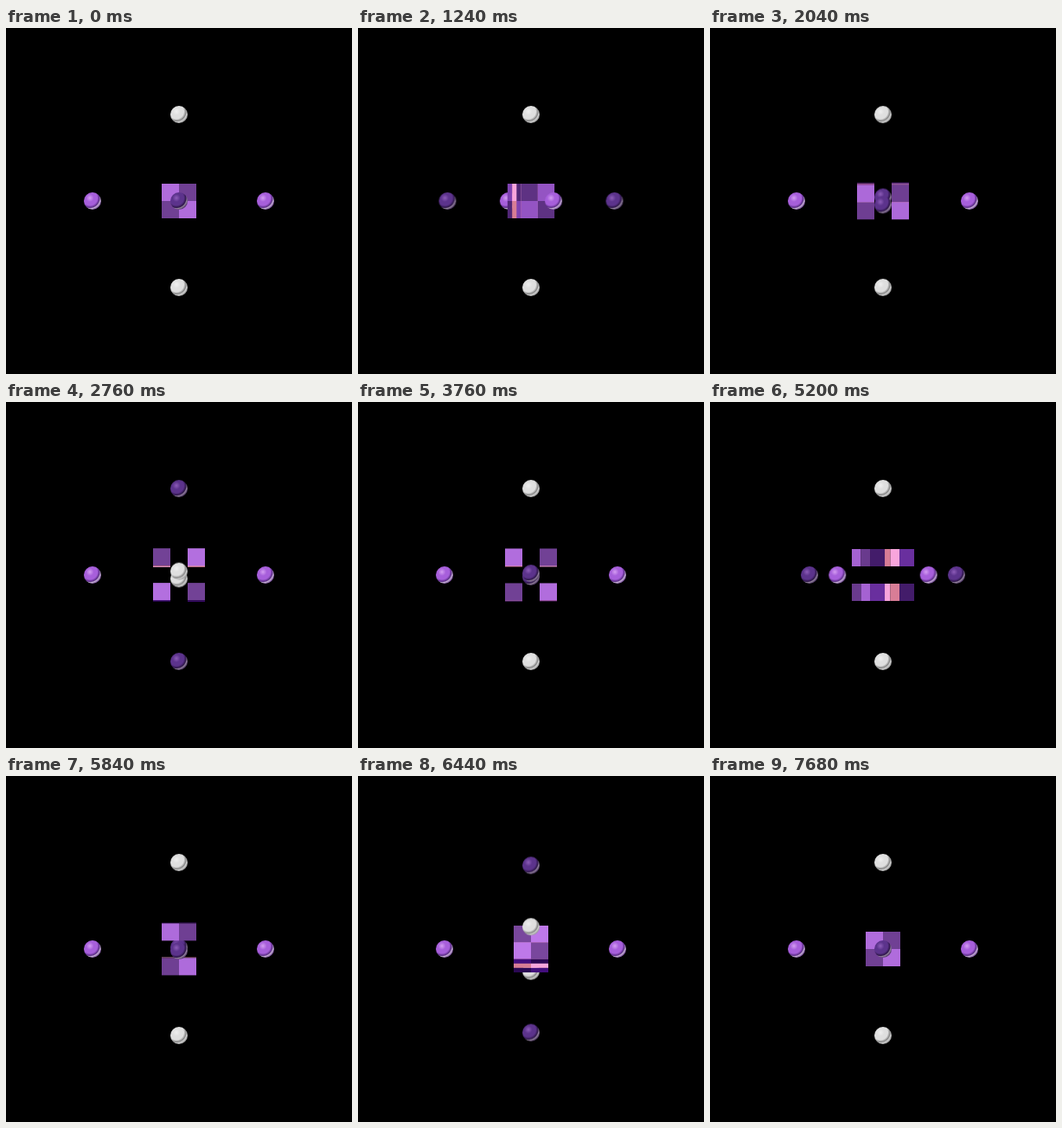
Recreate the animation shown at these times as an HTML page without scripts. Size 400x400 px, loop 7720 ms.

```html
<!DOCTYPE html>
<html lang="en">
<head>
<meta charset="utf-8">
<title>Turning cube</title>
<style>
@property --a { syntax: "<angle>"; inherits: true; initial-value: 0deg; }
@property --b { syntax: "<angle>"; inherits: true; initial-value: 0deg; }
@property --gx { syntax: "<number>"; inherits: true; initial-value: 0; }
@property --gy { syntax: "<number>"; inherits: true; initial-value: 0; }
@property --gz { syntax: "<number>"; inherits: true; initial-value: 0; }

html, body {
  margin: 0;
  width: 100%;
  height: 100%;
  overflow: hidden;
  background: #000;
}

.world, .world * {
  position: absolute;
  transform-style: preserve-3d;
}

.world {
  left: 200px;
  top: 200px;
  transform: rotateX(calc(-1 * var(--b))) rotateY(var(--a));
  animation: 7.72s infinite cubic-bezier(.45, 0, .55, 1);
  animation-name: yaw, pitch, gap-x, gap-y, gap-z;
  /* light on each axis, coming from the upper left */
  --ix: calc(-.48 * cos(var(--a)) - sin(var(--a)) * cos(var(--b)));
  --iy: calc(-.45 * cos(var(--b)) - sin(var(--b)));
  --iz: calc(cos(var(--a)) * (cos(var(--b)) - .45 * sin(var(--b))) - .48 * sin(var(--a)));
}

/* eight quarter turns of 960 ms, then a 40 ms rest */
@keyframes yaw {
  0% { --a: 0deg; }
  12.435% { --a: 90deg; }
  24.87%, 49.741% { --a: 180deg; }
  62.176% { --a: 90deg; }
  74.611%, 100% { --a: 0deg; }
}
@keyframes pitch {
  0%, 24.87% { --b: 0deg; }
  37.306% { --b: 90deg; }
  49.741%, 74.611% { --b: 180deg; }
  87.047% { --b: 270deg; }
  99.482%, 100% { --b: 360deg; }
}

/* each gap switches while its axis points at the viewer */
@keyframes gap-x {
  0%, 12.43% { --gx: 0; }
  12.44%, 62.17% { --gx: 10; }
  62.18%, 100% { --gx: 0; }
}
@keyframes gap-z {
  0%, 24.865% { --gz: 0; }
  24.875%, 74.605% { --gz: 10; }
  74.615%, 100% { --gz: 0; }
}
@keyframes gap-y {
  0%, 37.3% { --gy: 0; }
  37.31%, 87.04% { --gy: 10; }
  87.05%, 100% { --gy: 0; }
}

.box {
  --p: calc(var(--x) * var(--y) * var(--z));
  transform: translate3d(
    calc(var(--x) * (10 + var(--gx)) * 1px),
    calc(var(--y) * (10 + var(--gy)) * 1px),
    calc(var(--z) * (10 + var(--gz)) * 1px));
}

.box i {
  --k: 1;
  --l: max(.38, var(--i));
  left: -10px;
  top: -10px;
  width: 20px;
  height: 20px;
  backface-visibility: hidden;
  background: rgb(
    calc((144 + 32 * var(--p)) * var(--l))
    calc((86 + 22 * var(--p)) * (1.4 * var(--l) - .4))
    calc((184 + 36 * var(--p)) * (.3 + .7 * var(--l))));
}
.box .x {
  --i: calc(var(--x) * var(--ix));
  transform: rotateY(calc(var(--x) * var(--k) * 90deg)) translateZ(10px);
}
.box .y {
  --i: calc(var(--y) * var(--iy));
  transform: rotateX(calc(var(--y) * var(--k) * -90deg)) translateZ(10px);
}
.box .z {
  --i: calc(var(--z) * var(--iz));
  transform: rotateY(calc((1 - var(--z) * var(--k)) * 90deg)) translateZ(10px);
}

/* inner faces glow pink */
.box .in {
  --k: -1;
  background: rgb(
    calc(232 + 16 * var(--p))
    calc(145 + 20 * var(--p))
    calc(185 + 35 * var(--p)));
}
.x.in { opacity: var(--gx); }
.y.in { opacity: var(--gy); }
.z.in { opacity: var(--gz); }

.ball {
  left: -10px;
  top: -10px;
  width: 20px;
  height: 20px;
  border-radius: 50%;
  transform: translate3d(var(--at)) rotateY(calc(-1 * var(--a))) rotateX(var(--b));
  background: radial-gradient(circle at 7px 6.5px,
    var(--hi) 0, var(--main) 4.5px, var(--main) 8.5px,
    var(--shade) 11px, var(--rim) 12.2px, var(--shade) 15px);
}
.lilac { --hi: #d49cf2; --main: #a75fdb; --shade: #5c2d88; --rim: #c4aed2; }
.white { --hi: #efefef; --main: #dfdfdf; --shade: #858585; --rim: #cfcfcf; }
.plum { --hi: #8d5cb8; --main: #5c338c; --shade: #2e164a; --rim: #93829c; }
</style>
</head>
<body>
<div class="world">
  <div class="box" style="--x:-1;--y:-1;--z:-1"><i class="x"></i><i class="y"></i><i class="z"></i><i class="x in"></i><i class="y in"></i><i class="z in"></i></div>
  <div class="box" style="--x:1;--y:-1;--z:-1"><i class="x"></i><i class="y"></i><i class="z"></i><i class="x in"></i><i class="y in"></i><i class="z in"></i></div>
  <div class="box" style="--x:-1;--y:1;--z:-1"><i class="x"></i><i class="y"></i><i class="z"></i><i class="x in"></i><i class="y in"></i><i class="z in"></i></div>
  <div class="box" style="--x:1;--y:1;--z:-1"><i class="x"></i><i class="y"></i><i class="z"></i><i class="x in"></i><i class="y in"></i><i class="z in"></i></div>
  <div class="box" style="--x:-1;--y:-1;--z:1"><i class="x"></i><i class="y"></i><i class="z"></i><i class="x in"></i><i class="y in"></i><i class="z in"></i></div>
  <div class="box" style="--x:1;--y:-1;--z:1"><i class="x"></i><i class="y"></i><i class="z"></i><i class="x in"></i><i class="y in"></i><i class="z in"></i></div>
  <div class="box" style="--x:-1;--y:1;--z:1"><i class="x"></i><i class="y"></i><i class="z"></i><i class="x in"></i><i class="y in"></i><i class="z in"></i></div>
  <div class="box" style="--x:1;--y:1;--z:1"><i class="x"></i><i class="y"></i><i class="z"></i><i class="x in"></i><i class="y in"></i><i class="z in"></i></div>
  <b class="ball lilac" style="--at:-100px,0,0"></b>
  <b class="ball lilac" style="--at:100px,0,0"></b>
  <b class="ball white" style="--at:0,-100px,0"></b>
  <b class="ball white" style="--at:0,100px,0"></b>
  <b class="ball plum" style="--at:0,0,-100px"></b>
  <b class="ball plum" style="--at:0,0,100px"></b>
</div>
</body>
</html>
```
